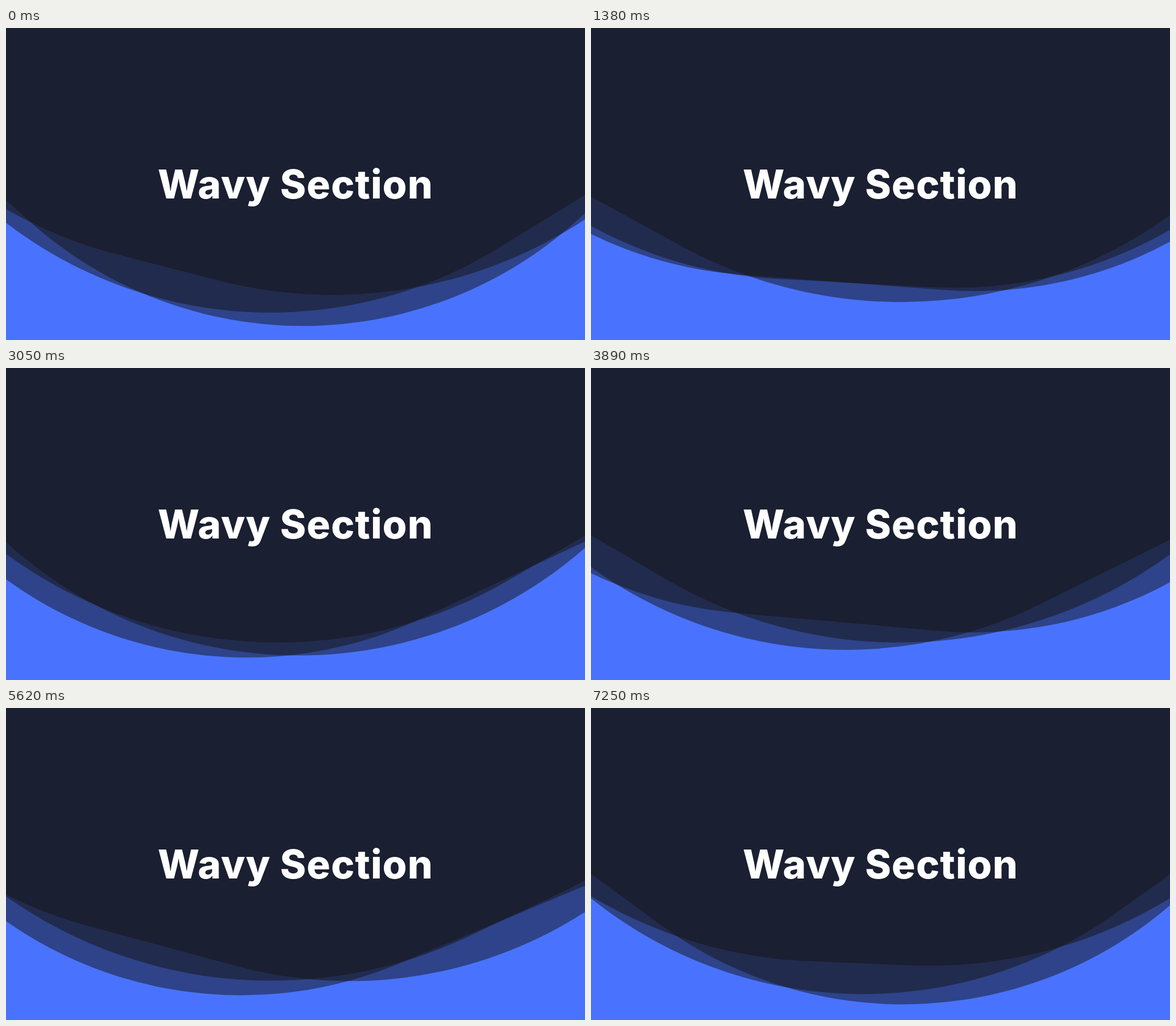
These frames come from a looping animation (1019x549 px, 7280 ms). An HTML page:

```html
<!DOCTYPE html>
<html lang="en">
<head>
<meta charset="utf-8">
<title>Wavy Section</title>
<style>
  @property --tick {
    syntax: '<number>';
    inherits: true;
    initial-value: 0;
  }

  html, body { margin: 0; width: 100%; height: 100%; overflow: hidden; }

  section {
    position: relative;
    width: 100%;
    height: 100%;
    overflow: hidden;
    background: #4973ff;
    animation: ticks 7280ms infinite;
  }

  /* All waves share one stepped clock, a little quicker at the start */
  @keyframes ticks {
    0% { --tick: 0; animation-timing-function: steps(18); }
    10.44% { --tick: 18; animation-timing-function: steps(140); }
    100% { --tick: 158; }
  }

  .wave {
    position: absolute;
    top: -1350px;
    left: calc(50% - 900px);
    width: 1800px;
    height: 1800px;
    border-radius: var(--round);
    background: rgba(20, 20, 20, .5);
    transform: rotate(calc(var(--start) + var(--turn) * var(--tick)));
  }
  .fast { --round: 45%; --start: 14.5deg; --turn: 3.362deg; }
  .medium { --round: 40%; --start: 42.2deg; --turn: 1.681deg; }
  .slow { --round: 42.5%; --start: 58.4deg; --turn: 1.1207deg; }

  h1 {
    position: absolute;
    left: 0;
    top: 235px;
    width: 100%;
    margin: 0;
    font: 800 69.5px/80px Poppins, Inter, sans-serif;
    letter-spacing: .015em;
    text-align: center;
    white-space: nowrap;
    color: #fff;
  }
</style>
</head>
<body>
<section>
  <div class="wave fast"></div>
  <div class="wave medium"></div>
  <div class="wave slow"></div>
  <h1>Wavy Section</h1>
</section>
</body>
</html>
```
